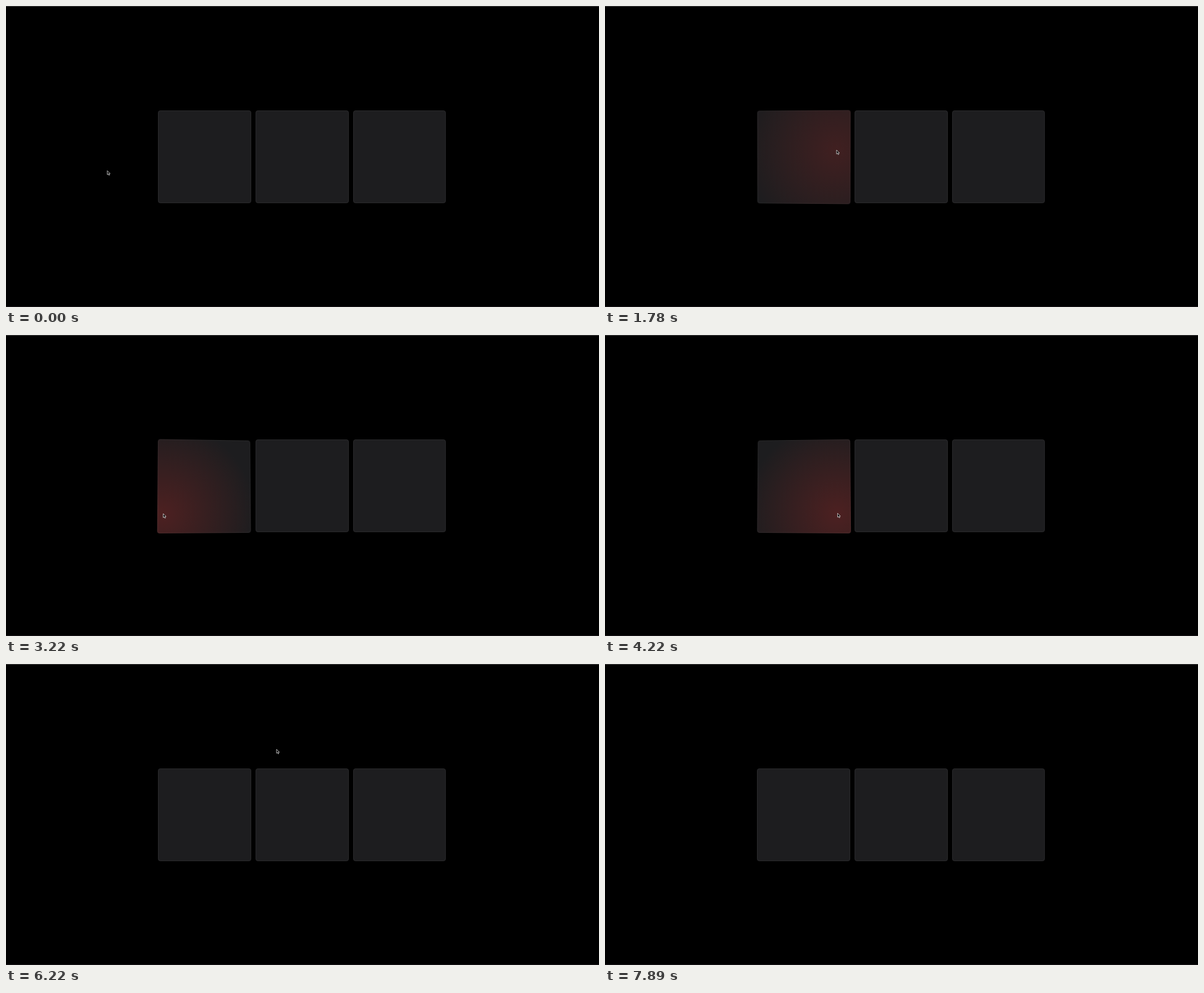
An HTML page that plays this animation: 960 px wide and 487 px high, repeating every 8.91 s.

```html
<!DOCTYPE html>
<html lang="en">
<head>
<meta charset="utf-8">
<title>Hover cards</title>
<style>
  html, body { margin: 0; width: 100%; height: 100%; overflow: hidden; background: #000; }
  .stage {
    position: relative; width: 960px; height: 487px; overflow: hidden;
    box-shadow: inset 0 1px #3c3c3c, inset 0 -1px #1a171a;
  }
  .card {
    position: absolute; left: calc(246.4px + 157.7px * var(--n)); top: 168.8px;
    width: 150.6px; height: 150.6px;
    border-radius: 4px; background: #1d1d1f; overflow: hidden;
  }
  .card::after {
    content: ""; position: absolute; inset: 0; border-radius: 4px;
    border: 1px solid rgba(255, 255, 255, .05);
  }
  .glow {
    position: absolute; inset: 0; opacity: 0;
    background: radial-gradient(circle 150px at var(--x) var(--y), rgba(255, 45, 40, .21), rgba(255, 45, 40, 0));
  }
  .cursor { position: absolute; left: 0; top: 0; width: 8px; height: 10px; overflow: visible; }
</style>
</head>
<body>
<div class="stage">
  <div class="card" id="card" style="--n: 0"><div class="glow" id="glow"></div></div>
  <div class="card" style="--n: 1"></div>
  <div class="card" style="--n: 2"></div>
  <svg class="cursor" id="cursor" viewBox="0 0 8 10">
    <path d="M0 0V6.4L1.5 5.1 2.6 7.4 3.7 6.9 2.7 4.7H4.6Z" fill="#000" stroke="#e4e4e4" stroke-width=".75"/>
  </svg>
</div>
<script>
  const LOOP = 8910, FPS = 9;
  const CARD = { x: 246.4, y: 168.8, half: 75.3 };
  const TILT = 0.067; // degrees per pixel from the card's centre
  const HOVER = { enter: 1480, leave: 5500, fade: 400 };

  // The pointer shows only during a stroke; points are time, x, y.
  const strokes = [
    { from: 0, to: 550, points: [[0, 164, 266.5], [330, 165.5, 267]] },
    { from: 550, to: 660, points: [[550, 18.5, 143.5]] },
    { from: 990, to: 7880, points: [
      [1450, 401.5, 263.5], [2222, 309.5, 183], [2889, 238.5, 250],
      [3222, 254.5, 289], [4000, 365, 304], [5111, 389.5, 196],
      [6222, 438, 138], [7000, 433, 154], [7778, 459, 160]
    ] }
  ];

  const clamp = (v, lo, hi) => Math.min(hi, Math.max(lo, v));
  const ramp = (t, from) => clamp((t - from) / HOVER.fade, 0, 1);

  // Smooth curve through the points, at rest at both ends.
  function spline(points, t) {
    const last = points.length - 1;
    if (t <= points[0][0]) return points[0].slice(1);
    if (t >= points[last][0]) return points[last].slice(1);

    const i = points.findIndex(p => p[0] > t) - 1;
    const a = points[i], b = points[i + 1], span = b[0] - a[0];
    const u = (t - a[0]) / span;
    const slope = (j, k) => j === 0 || j === last ? 0 :
      span * (points[j + 1][k] - points[j - 1][k]) / (points[j + 1][0] - points[j - 1][0]);
    return [1, 2].map(k =>
      a[k] + (b[k] - a[k]) * u * u * (3 - 2 * u) +
      slope(i, k) * u * (1 - u) ** 2 - slope(i + 1, k) * u * u * (1 - u));
  }

  function draw(time) {
    // the picture advances in nine steps a second
    const t = Math.floor((time + 3) * FPS / 1000) * 1000 / FPS;
    const stroke = strokes.find(s => t >= s.from && t < s.to);
    cursor.style.visibility = stroke ? "visible" : "hidden";
    card.style.transform = "none";
    glow.style.opacity = 0;
    if (!stroke) return;

    const [x, y] = spline(stroke.points, t);
    cursor.style.transform = `translate(${x}px, ${y}px)`;

    const hover = ramp(t, HOVER.enter) - ramp(t, HOVER.leave);
    if (!hover) return;
    const left = x - CARD.x, top = y - CARD.y;
    const rx = (top - CARD.half) * TILT * hover;
    const ry = (CARD.half - left) * TILT * hover;
    glow.style.opacity = hover;
    glow.style.setProperty("--x", left + "px");
    glow.style.setProperty("--y", top + "px");
    card.style.transform = `perspective(500px) rotateX(${rx}deg) rotateY(${ry}deg)`;
  }

  const [card, glow, cursor] = ["card", "glow", "cursor"].map(id => document.getElementById(id));
  const start = performance.now();

  function tick() {
    draw((performance.now() - start) % LOOP);
    requestAnimationFrame(tick);
  }
  tick();
</script>
</body>
</html>
```
